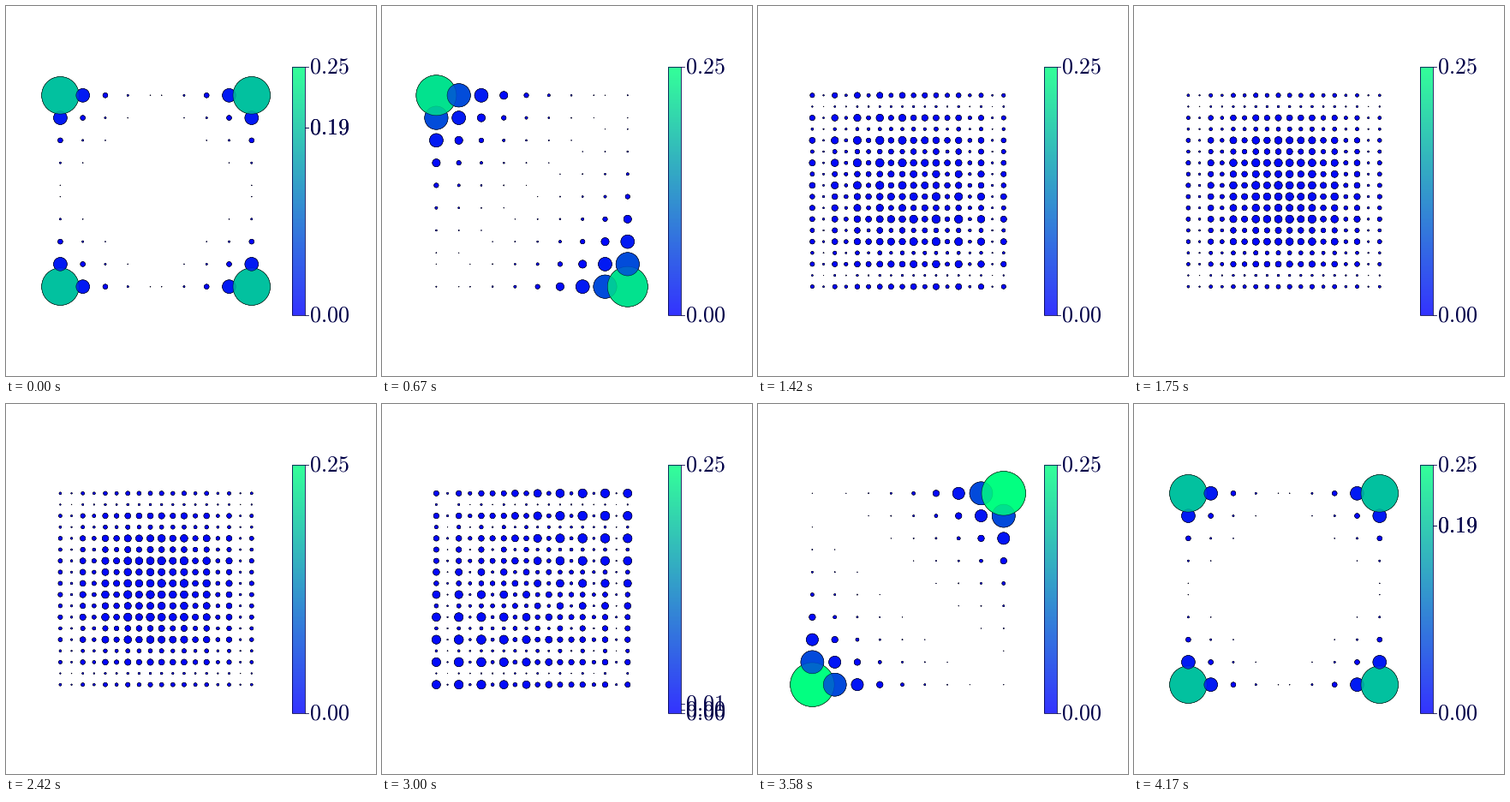
These frames come from a looping animation (432x432 px, 4.26 s). A matplotlib script:

```python
import numpy as np
import matplotlib.pyplot as plt
from matplotlib.animation import FuncAnimation

plt.rcParams["mathtext.fontset"] = "cm"

SIZE, SITES, STEPS = 432, 18, 50
LOOP, TICK = 4260, 20            # ms
STEP = 250 / 3                   # ms per pump step
VMAX = 0.25
LEFT, TOP, PITCH = 63.4, 104.3, 13.14
BAR = (334, 349, 361, 71)        # left, right, bottom, top
INK = "#000048"
LABELLED = {0, 36, STEPS}        # steps that mark the corner values on the bar

fig = plt.figure(figsize=(SIZE / 72, SIZE / 72), dpi=72, facecolor="white")
ax = fig.add_axes([0, 0, 1, 1])
ax.axis("off")

# Sites run from the bottom row to the top row, left to right.
rows, cols = np.mgrid[SITES - 1:-1:-1, 0:SITES]
sites = np.column_stack([LEFT + PITCH * cols.ravel(),
                         TOP + PITCH * rows.ravel()])


def chain_state(ratio):
    """Smallest positive level of a dimerised chain and its density."""
    hops = np.where(np.arange(SITES - 1) % 2 == 0, ratio, 1.0)
    energy, states = np.linalg.eigh(np.diag(hops, 1) + np.diag(hops, -1))
    return energy[SITES // 2], states[:, SITES // 2] ** 2


def density(step):
    """Probability on the square lattice, indexed [row, column]."""
    theta = 2 * np.pi * step / STEPS
    c = np.cos(theta)
    eps, dens = chain_state(np.exp(-c * (1.02 if c > 0 else 0.4 - 0.36 * c)))
    delta = 0.17 * np.sin(theta)
    tilt = delta / np.sqrt(2 * eps ** 2 + delta ** 2)
    even = np.arange(SITES) % 2 == 0
    a, b = dens * even, dens * ~even
    same = np.outer(a, a) + np.outer(b, b)
    cross = np.outer(a, b) + np.outer(b, a)
    return (1 + tilt) * same + (1 - tilt) * cross


def bar_y(value):
    return BAR[2] + (BAR[3] - BAR[2]) * value / VMAX


def add_tick():
    mark, = ax.plot([], [], color=INK, lw=0.8)
    label = ax.text(354, 0, "", fontsize=26, color=INK, va="center", ha="left")
    return mark, label


def set_tick(tick, value):
    mark, label = tick
    y = bar_y(value)
    mark.set_data([BAR[1], BAR[1] + 3.5], [y, y])
    label.set_y(y + 0.5)
    label.set_text(f"${value:.2f}$")


def show_tick(tick, on):
    for part in tick:
        part.set_visible(on)


ax.imshow(np.linspace(0, 1, 256)[:, None], cmap="winter", alpha=0.8,
          extent=BAR, origin="lower", aspect="auto")
ax.add_patch(plt.Rectangle((BAR[0], BAR[3]), BAR[1] - BAR[0], BAR[2] - BAR[3],
                           fill=False, ec=INK, lw=0.8))
for value in (0, VMAX):
    set_tick(add_tick(), value)
extra = [add_tick(), add_tick()]

dots = ax.scatter([], [], s=[], c=[], cmap="winter", vmin=0, vmax=VMAX,
                  alpha=0.8, edgecolors="black", linewidths=0.5)
ax.set_xlim(0, SIZE)
ax.set_ylim(SIZE, 0)


def draw(i):
    step = min(int((TICK * (i + 0.5) + 5) / STEP), STEPS)
    grid = density(step)
    values = grid[::-1].ravel()
    seen = values > 2e-5
    # Translucent layers keep overlaps visible but colours deep.
    layers = np.tile(values[seen], 3)
    dots.set_offsets(np.tile(sites[seen], (3, 1)))
    dots.set_sizes(1e4 * layers)
    dots.set_array(layers)
    for tick, corner in zip(extra, (grid[0, 0], grid[0, -1])):
        show_tick(tick, step in LABELLED)
        if step in LABELLED:
            set_tick(tick, corner)
    return [dots]


anim = FuncAnimation(fig, draw, frames=LOOP // TICK, interval=TICK,
                     init_func=lambda: draw(0), repeat=True, repeat_delay=0)
plt.show()
```
